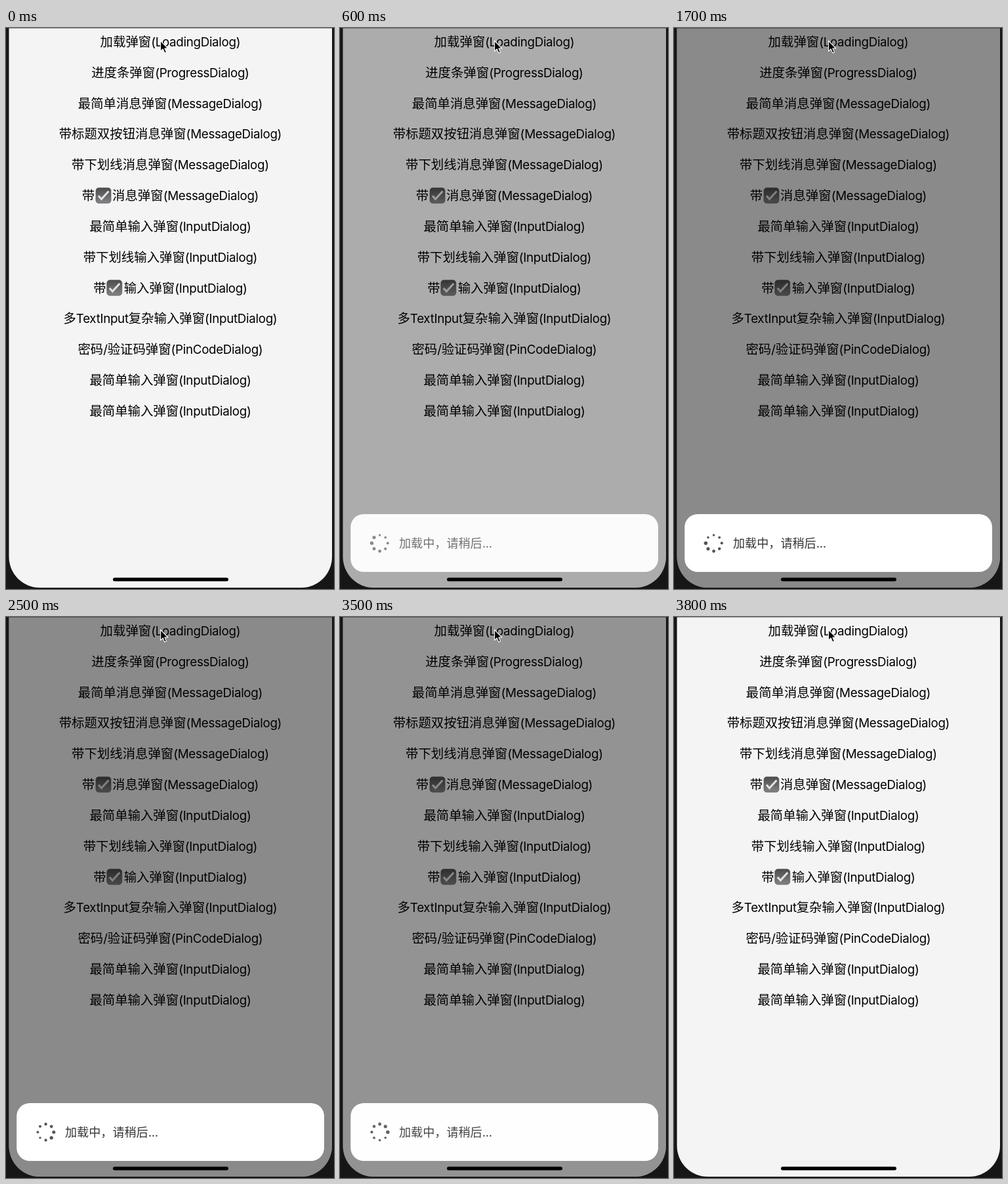
Recreate the animation shown at these times as an HTML page. Size 500 by 854 pixels, loop 4 s.

```html
<!DOCTYPE html>
<html lang="zh-CN">
<head>
<meta charset="utf-8">
<style>
  html, body { margin: 0; width: 100%; height: 100%; overflow: hidden; background: #161616; }
  svg { display: block; }
  text { font: 19.4px "Noto Sans CJK SC", "Noto Sans CJK", sans-serif; }
  .row { text-anchor: middle; }
  .latin { font: 18.8px Inter, sans-serif; letter-spacing: -.33px; }
  #modal text { font-size: 18.1px; fill: #333; }
</style>
</head>
<body>
<svg width="500" height="854" viewBox="0 0 500 854">
  <defs>
    <linearGradient id="grey" x2="0" y2="1">
      <stop stop-color="#4c4c4e"/>
      <stop offset="1" stop-color="#838386"/>
    </linearGradient>
    <rect id="screen" x="4.5" y="-100" width="492.5" height="952" rx="47"/>
    <g id="check">
      <rect x="-11.5" y="-11.7" width="23" height="23.4" rx="4.5" fill="url(#grey)" stroke="#4c4c4e" stroke-width=".6"/>
      <path d="M-7.5 .5 L-3 5.5 L8 -6.5" fill="none" stroke="#e2e2e2" stroke-width="3"/>
    </g>
  </defs>
  <use href="#screen" fill="#f4f4f4"/>
  <g id="list"></g>
  <use href="#check" x="148.5" y="255"/>
  <use href="#check" x="165.3" y="395.5"/>
  <g id="modal">
    <use href="#screen" fill="#000" opacity=".434"/>
    <rect x="16.2" y="740" width="468.8" height="88" rx="20" fill="#fff"/>
    <g id="dots" fill="#555"></g>
    <text x="90" y="791">加载中，请稍后<tspan class="latin">...</tspan></text>
  </g>
  <rect x="4" width="493" height="1" fill="#000" opacity=".35"/>
  <rect x="163" y="836.7" width="176" height="5.6" rx="2.8"/>
  <path d="M235.6 19.5 V35.4 L239.2 32 L241.8 38 L244.4 36.9 L241.9 31 H246.8 Z" stroke="#fff" stroke-width="1.1" stroke-linejoin="round"/>
</svg>
<script>
const $ = id => document.getElementById(id);

// "_" leaves room for a check box
const rows = [
  '加载弹窗(LoadingDialog)', '进度条弹窗(ProgressDialog)', '最简单消息弹窗(MessageDialog)',
  '带标题双按钮消息弹窗(MessageDialog)', '带下划线消息弹窗(MessageDialog)', '带_消息弹窗(MessageDialog)',
  '最简单输入弹窗(InputDialog)', '带下划线输入弹窗(InputDialog)', '带_输入弹窗(InputDialog)',
  '多TextInput复杂输入弹窗(InputDialog)', '密码/验证码弹窗(PinCodeDialog)',
  '最简单输入弹窗(InputDialog)', '最简单输入弹窗(InputDialog)'
];
const markup = s => s
  .replace(/[()\/A-Za-z]+/g, '<tspan class="latin">$&</tspan>')
  .replace(/_(..)/, '<tspan dx="27">$1</tspan>');
$('list').innerHTML = rows.map((s, i) =>
  `<text class="row" x="250.4" y="${28 + 46.83 * i}">${markup(s)}</text>`).join('');

const COUNT = 8, RING = 12.2;
$('dots').innerHTML = Array.from({ length: COUNT }, (_, i) => {
  const a = i / COUNT * 2 * Math.PI;
  return `<circle cx="${60.6 + RING * Math.sin(a)}" cy="${784.2 - RING * Math.cos(a)}"/>`;
}).join('');
const dots = [...$('dots').children];

const ease = (t, from, to) => {
  const k = Math.min(1, Math.max(0, (t - from) / (to - from)));
  return k * k * (3 - 2 * k);
};

function draw(now) {
  const t = Math.floor(now % 4000 / 100) * 100;
  $('modal').setAttribute('opacity', ease(t, 340, 760) - ease(t, 3455, 3700));
  const head = t / 1200 * COUNT + 2.8;
  dots.forEach((dot, i) => {
    const age = (head - i + COUNT) % COUNT;
    const scale = age < 7 ? 1.2 - .5 * age / 7 : .7 + .5 * (age - 7);
    dot.setAttribute('r', 2.3 * scale);
  });
}

const start = performance.now();
function tick() {
  draw(performance.now() - start);
  requestAnimationFrame(tick);
}
tick();
</script>
</body>
</html>
```
